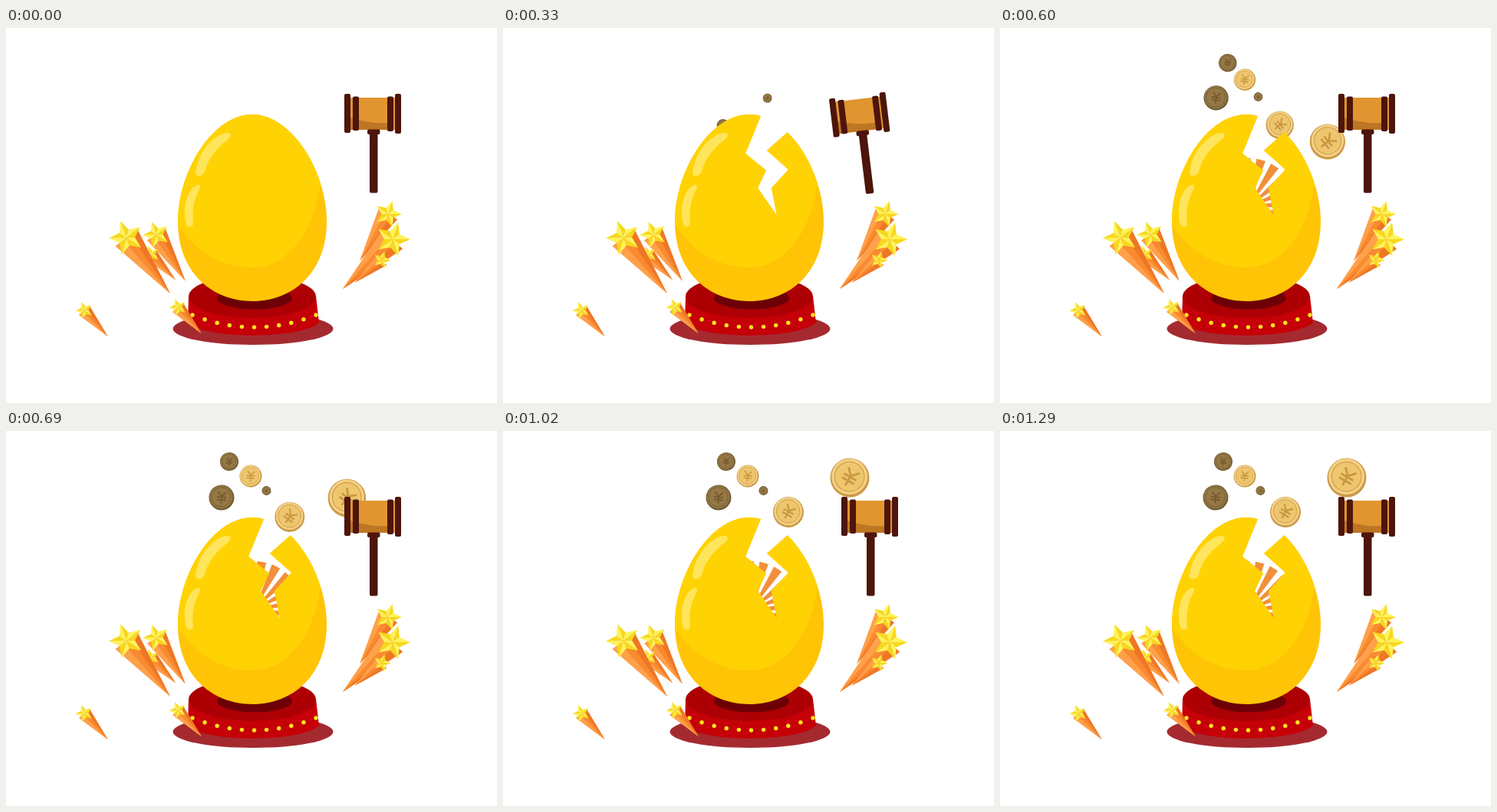
These frames come from a looping animation (640 px wide and 490 px high, 1320 ms). An HTML page:

```html
<!DOCTYPE html>
<html lang="en">
<head>
<meta charset="utf-8">
<title>Golden egg</title>
<style>
html, body { margin: 0; width: 100%; height: 100%; overflow: hidden; background: #fff; }
svg { display: block; width: 100%; height: 100%; }
</style>
</head>
<body>
<svg viewBox="0 0 640 490">
  <defs>
    <clipPath id="notch">
      <path d="M0 0H336V115L316 164L343 186L332 209L357 245L350 209L372 185L344 160L371 136V0H640V490H0Z"/>
    </clipPath>
    <clipPath id="shell">
      <path d="M321 113C373 113 418 188 418 253C418 318 375 357 321 357C267 357 224 318 224 253C224 188 269 113 321 113Z"/>
    </clipPath>
  </defs>

  <g id="base">
    <ellipse cx="322" cy="393" rx="104.5" ry="21" fill="#a42a30"/>
    <path d="M238 350L237 386C262 407 384 407 408 385L404 350Z" fill="#c50007"/>
    <ellipse cx="321" cy="351" rx="83" ry="28" fill="#ad0004"/>
    <ellipse cx="324" cy="353" rx="49" ry="14.5" fill="#6d0006"/>
  </g>

  <g id="rays" fill="#f28f3a"></g>
  <g id="coins"></g>

  <g id="egg">
    <g clip-path="url(#shell)">
      <rect x="220" y="110" width="202" height="250" fill="#ffc405"/>
      <path d="M220 100H400L411 182C410 255 372 313 321 313C284 313 246 295 220 250Z" fill="#ffd203"/>
    </g>
    <g fill="#ffe55c">
      <path d="M290 137C274 136 249 161 247 190C249 196 257 193 259 188C263 171 274 157 289 146C294 142 294 138 290 137Z"/>
      <path d="M250 205C236 209 229 237 235 256C237 261 243 261 244 256C242 239 245 224 252 211C254 207 253 204 250 205Z"/>
    </g>
  </g>

  <g id="comets"></g>

  <g id="hammer">
    <rect x="446" y="91" width="64" height="42" fill="#e19531"/>
    <path d="M446 116C468 124 488 125 498 124V133H446Z" fill="#bd7623"/>
    <g fill="#4d150b">
      <rect x="474" y="133" width="10.5" height="82.5" rx="2"/>
      <rect x="471" y="132.5" width="16.5" height="6.5" rx="2"/>
      <rect x="441" y="86" width="8" height="51" rx="2"/>
      <rect x="452" y="89.5" width="8" height="44.5" rx="2"/>
      <rect x="497" y="89.5" width="8" height="45.5" rx="2"/>
      <rect x="507" y="86" width="8" height="52" rx="2"/>
    </g>
  </g>
</svg>
<script>
const LOOP = 1320, STEP = 30, HIT = 180, FLIGHT = 400;
const $ = id => document.getElementById(id);
const repeat = (n, fn) => Array.from({ length: n }, (_, i) => fn(i)).join('');
const clamp = v => Math.max(0, Math.min(1, v));
const smooth = v => v * v * (3 - 2 * v);
const mix = (a, b, k) => a + (b - a) * k;
const polar = (r, deg) => [r * Math.cos(deg * Math.PI / 180), r * Math.sin(deg * Math.PI / 180)];
const poly = (pts, fill) =>
  `<polygon points="${pts.map(p => p.map(v => v.toFixed(1)).join()).join(' ')}" fill="${fill}"/>`;

// Pedestal lights on a shallow arc
$('base').innerHTML += repeat(11, i => {
  const k = i - 5;
  return `<circle cx="${323.5 + k * 16.1}" cy="${391 - 0.64 * k * k}" r="2.7" fill="#ffe31f"/>`;
});

// Drawn around the star's centre; the tail leans to the right
function comet({ x, y, r, lean }) {
  const left = x < 320;
  const angle = left ? lean : 180 - lean, tilt = left ? -20 : 18;
  const tip = polar(r * 4.2, angle);
  const tail = (a, b, fill) =>
    poly([polar(r * a, angle + 90), polar(r * b, angle + 90), tip], fill);
  const star = repeat(5, i => {
    const a = tilt - 90 + i * 72, point = polar(r * 1.05, a);
    return poly([[0, 0], polar(r * .5, a - 36), point], '#fff25a')
      + poly([[0, 0], point, polar(r * .5, a + 36)], '#f6d81c');
  });
  return `<g transform="translate(${x} ${y})">`
    + tail(-.82, .82, '#f98a30') + tail(-.82, -.3, '#ee7726') + tail(.25, .82, '#ffa04a')
    + star + '</g>';
}
$('comets').innerHTML = [
  { x: 196, y: 270, r: 17, lean: 58 },
  { x: 189, y: 296, r: 11, lean: 46 },
  { x: 157, y: 274, r: 22, lean: 52 },
  { x: 102, y: 369, r: 11, lean: 48 },
  { x: 224, y: 365, r: 11, lean: 48 },
  { x: 498, y: 243, r: 17, lean: 59 },
  { x: 504, y: 276, r: 22, lean: 45 },
  { x: 490, y: 303, r: 11, lean: 40 }
].map(comet).join('');

// Sunburst inside the shell
const SPOKES = 20, GAP = 360 / SPOKES;
$('rays').innerHTML = repeat(SPOKES, i =>
  poly([[0, 0], polar(63, (i - .3) * GAP), polar(63, (i + .3) * GAP)], 'inherit'));

// Each coin flies from one point to its resting place; big ones leave later
const coins = [
  { from: [347, 94], to: [291, 40], r: 12, dark: true },
  { from: [319, 141], to: [319, 59], r: 14.5 },
  { from: [287, 129], to: [281, 87], r: 16.5, dark: true },
  { from: [311, 193], to: [339.5, 78], r: 6, dark: true },
  { from: [355, 155], to: [372, 106], r: 20 },
  { from: [393, 267], to: [452, 61], r: 25.5 }
];

function coin({ dark }) {
  const [rim, edge, face, line] = dark
    ? ['#6f5a31', '#8f7444', '#957846', '#745a2b']
    : ['#cb9946', '#f3cf84', '#eec66d', '#c99742'];
  return `<g><circle r="1" fill="${rim}"/>
    <circle cx="-.04" cy="-.04" r=".92" fill="${edge}"/>
    <circle cx="-.04" cy="-.04" r=".76" fill="${face}" stroke="${line}" stroke-width=".04"/>
    <path d="M-.32 -.44L0 -.1L.32 -.44M0 -.1V.46M-.36 -.04H.36M-.36 .18H.36" fill="none" stroke="${line}" stroke-width=".11"/></g>`;
}
$('coins').innerHTML = coins.map(coin).join('');
const coinNodes = [...$('coins').children];

function moveCoin({ from, to, r }, node, t) {
  const big = r >= 20;
  const u = clamp((t - (big ? 380 : 280)) / FLIGHT), k = smooth(u);
  const size = r * mix(.78, 1, k) * clamp(u * 5);
  const turn = mix(50, 0, k) + (big ? 30 : 5);
  node.setAttribute('visibility', u > 0 ? 'visible' : 'hidden');
  node.setAttribute('transform',
    `translate(${mix(from[0], to[0], k)} ${mix(from[1], to[1], k)}) rotate(${turn}) scale(${size})`);
}

function draw(t) {
  const swing = t <= HIT ? (t / HIT) ** 2 : 1 - smooth(clamp((t - HIT) / 210));
  $('hammer').setAttribute('transform',
    `translate(${-6.5 * swing} ${5 * swing}) rotate(${-34.5 * swing} 479 213)`);

  $('egg').setAttribute('clip-path', t >= HIT - STEP ? 'url(#notch)' : 'none');

  const grow = clamp((t - 400) / 170);
  $('rays').setAttribute('visibility', grow > 0 ? 'visible' : 'hidden');
  $('rays').setAttribute('transform',
    `translate(324 233) rotate(${(t - 810) * 1.5 * GAP / 210 - 66}) scale(${grow})`);

  coins.forEach((c, i) => moveCoin(c, coinNodes[i], t));
}

const start = performance.now();
function frame() {
  const t = (performance.now() - start) % LOOP;
  draw(Math.floor(t / STEP) * STEP);
  requestAnimationFrame(frame);
}
frame();
</script>
</body>
</html>
```
